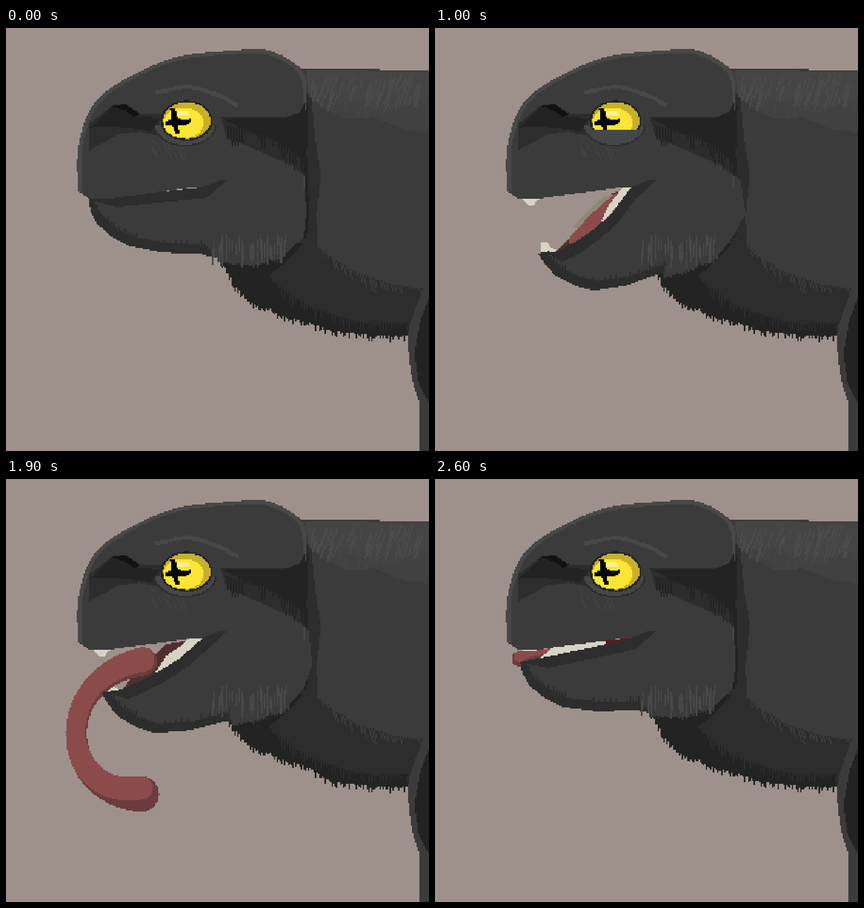
An HTML page with a canvas that plays this animation: 748 px wide and 748 px high, repeating every 2.7 s.

```html
<!DOCTYPE html>
<html lang="en">
<head>
<meta charset="utf-8">
<title>Creature</title>
<style>
  html, body { margin: 0; width: 100%; height: 100%; overflow: hidden; background: #9e918b; }
  canvas { display: block; width: 100vw; height: 100vh; image-rendering: pixelated; }
</style>
</head>
<body>
<canvas id="stage" width="300" height="300"></canvas>
<script>
const ctx = document.getElementById('stage').getContext('2d');
const GRID = 300, SCALE = GRID / 748, LOOP = 2700, STEP = 100;
const C = {
  back: '#9e918b', base: '#3b3b3b', dark: '#2d2d2d', deep: '#232323', rim: '#484848', soft: '#414141',
  lid: '#45464a', bone: '#d8d4c4', cheek: '#8e8878', blood: '#5f1b1b', cave: '#4f2f30',
  pink: '#8c4b4b', wine: '#6b3c3d', yellow: '#fbe635', gold: '#c9b02a', shine: '#fff28c', black: '#060606'
};

// Points are [x, y] or [x, y, width], written as "x,y x,y".
const pts = text => text.trim().split(/\s+/).map(p => p.split(',').map(Number));
const move = (list, dx, dy) => list.map(([x, y]) => [x + dx, y + dy]);
const mix = (a, b, f) => Array.isArray(a) ? a.map((v, i) => mix(v, b[i], f)) : a + (b - a) * f;
const noise = n => { const v = Math.sin(n * 127.1 + 11.7) * 43758.5453; return v - Math.floor(v); };

// Interpolates between [time, value] keys.
function pose(keys, t) {
  const i = keys.findIndex(k => k[0] >= t);
  if (i < 0) return keys[keys.length - 1][1];
  if (i === 0) return keys[0][1];
  const [t0, a] = keys[i - 1], [t1, b] = keys[i];
  return mix(a, b, (t - t0) / (t1 - t0));
}

const bezier = ([a, b, c, d], s) =>
  mix(mix(mix(a, b, s), mix(b, c, s), s), mix(mix(b, c, s), mix(c, d, s), s), s);

// Rounds an open line through its points.
function smooth(list) {
  const out = [], get = i => list[Math.max(0, Math.min(list.length - 1, i))];
  for (let s = 0; s <= list.length - 1; s += .125) {
    const i = Math.floor(s), f = s - i, [a, b, c, d] = [-1, 0, 1, 2].map(k => get(i + k));
    out.push(b.map((v, q) => v + f * (c[q] - a[q] + f * (2 * a[q] - 5 * v + 4 * c[q] - d[q]
      + f * (3 * (v - c[q]) + d[q] - a[q]))) / 2));
  }
  return out;
}

// Fills a polygon row by row, without soft edges.
function poly(color, shape) {
  const p = typeof shape === 'string' ? pts(shape) : shape;
  const ys = p.map(q => q[1] * SCALE);
  const end = Math.min(GRID, Math.ceil(Math.max(...ys)));
  ctx.fillStyle = color;
  for (let y = Math.max(0, Math.floor(Math.min(...ys))); y < end; y++) {
    const row = (y + .5) / SCALE, xs = [];
    p.forEach(([x0, y0], i) => {
      const [x1, y1] = p[(i + 1) % p.length];
      if ((y0 <= row) !== (y1 <= row)) xs.push((x0 + (x1 - x0) * (row - y0) / (y1 - y0)) * SCALE);
    });
    xs.sort((a, b) => a - b);
    for (let i = 0; i + 1 < xs.length; i += 2) {
      const x = Math.round(xs[i]);
      ctx.fillRect(x, y, Math.round(xs[i + 1]) - x, 1);
    }
  }
}

function oval(color, cx, cy, rx, ry = rx) {
  const p = [];
  for (let a = 0; a < 6.28; a += Math.PI / 16) p.push([cx + rx * Math.cos(a), cy + ry * Math.sin(a)]);
  poly(color, p);
}

function within(top, bottom, paint) {
  const y = Math.round(top * SCALE);
  ctx.save();
  ctx.beginPath();
  ctx.rect(0, y, GRID, Math.round(bottom * SCALE) - y);
  ctx.clip();
  paint();
  ctx.restore();
}

function hair(x, y, length, slant) {
  const rows = Math.round(Math.abs(length) * SCALE), dir = Math.sign(length);
  for (let i = 0; i <= rows; i++) {
    ctx.fillRect(Math.round(x * SCALE + i * slant), Math.round(y * SCALE) + i * dir, 1, 1);
  }
}

// Height of a line at x.
function heightAt(line, x) {
  for (let i = 1; i < line.length; i++) {
    const [x0, y0] = line[i - 1], [x1, y1] = line[i];
    if ((x - x0) * (x - x1) <= 0 && x0 !== x1) return y0 + (y1 - y0) * (x - x0) / (x1 - x0);
  }
  return line[line.length - 1][1];
}

// Hairs of random length along a line.
function fringe(color, shape, length, slant = 0, gap = 2.5) {
  const line = typeof shape === 'string' ? pts(shape) : shape, xs = line.map(p => p[0]);
  const root = 4 * Math.sign(length);
  ctx.fillStyle = color;
  for (let x = Math.ceil(Math.min(...xs) / gap) * gap; x < Math.max(...xs); x += gap) {
    hair(x, heightAt(line, x) - root, length * noise(x) ** 2 + root, slant);
  }
}

function scatter(color, count, x, y, w, h, length, slant) {
  ctx.fillStyle = color;
  for (let i = 0; i < count; i++) {
    hair(x + w * noise(i + x), y + h * noise(i * 3 + y), length * (.4 + .6 * noise(i * 7)), slant);
  }
}

const gapeKeys = [[300, 0], [800, .17], [1000, .5], [1700, .5], [2000, .33], [2600, .1]];
const throatKeys = [[1000, 0], [1700, 1], [2000, 1], [2600, 0]];
const lidKeys = [[900, 200], [1000, 180], [1400, 153], [1500, 132], [1600, 165], [1700, 200]];

// Tongue: a curve from root to tip with widths, and the shaded side at root and tip.
const tongueKeys = [
  [800, '325,303,0 298,327,0 271,352,0 244,376,0 0,0'],
  [1000, '325,303,24 298,327,30 271,352,26 244,376,16 0,0'],
  [1400, '325,303,26 240,400,50 160,325,48 153,428,36 1,1'],
  [1600, '305,312,40 95,345,50 45,560,28 134,602,54 1,.4'],
  [1700, '285,318,60 120,400,34 85,640,22 216,648,68 1,-.6'],
  [2000, '220,325,46 60,330,36 95,520,28 250,512,62 0,-1'],
  [2600, '205,307,14 185,309,14 170,311,12 150,318,28 1,.8']
].map(([t, text]) => [t, pts(text)]);

function drawTongue(t) {
  const curve = pose(tongueKeys, t), [rootSide, tipSide] = curve[4], count = 60;
  if (curve[0][2] < 2) return;
  const spots = Array.from({ length: count + 1 }, (_, i) => bezier(curve, i / count));
  for (const [x, y, w] of spots) oval(C.wine, x, y, w / 2);
  spots.forEach(([x, y, w], i) => {
    const a = spots[Math.max(0, i - 1)], b = spots[Math.min(count, i + 1)];
    const dx = b[0] - a[0], dy = b[1] - a[1], len = Math.hypot(dx, dy) || 1;
    const shade = .4 * mix(rootSide, tipSide, (i / count) ** 3), r = w / 2;
    oval(C.pink, x - dy / len * r * shade, y + dx / len * r * shade, r * (1 - Math.abs(shade)));
  });
}

// The jaw swings about its hinge; the flesh below sags as it opens.
const hinge = [350, 284], lipFront = [147, 303], lipCorner = [345, 282];
const chin = pts('149,322 160,345 185,368 215,385 275,397 345,400');

function swing([x, y], angle, sag) {
  const dx = x - hinge[0], dy = y - hinge[1], c = Math.cos(angle), s = Math.sin(angle);
  return [hinge[0] + dx * c + dy * s, hinge[1] + dy * c - dx * s + sag];
}

function jawAt(a) {
  const lip = [0, 1, 2, 3, 4, 5].map(i => swing(mix(lipFront, lipCorner, i / 5), a,
    110 * a * a * Math.sqrt(Math.sin(Math.PI * i / 5))));
  const under = chin.map((p, i) => swing(p, a, 18 * a * i)).reverse();
  const cheek = [[528 + 48 * a * a, 270], [531 + 72 * a * a, 328], [526, 370],
    [490 + 20 * a, 403], [430 + 40 * a, 417 + 16 * a], [375 + 60 * a, 408 + 60 * a]];
  return { lip, under, cheek };
}

function drawBody(t) {
  const lift = 12 * pose(throatKeys, t);
  const throat = pts('374,396 405,452 430,480 480,502 530,517 575,532')
    .map(([x, y], i) => [x, i % 5 ? y - lift : y]);
  const belly = [...throat, ...pts('620,537 655,541 708,541')];
  const under = pts('548,380 580,408 620,432 680,452 748,462');
  const shadow = pts('465,438 482,455 530,488 600,514 650,523 710,520');
  const leg = smooth(pts('748,442 722,500 711,550 718,620 731,662'));
  poly(C.base, [...belly, ...pts('748,560 748,76 640,73 520,73 500,200 480,380')]);
  poly(C.soft, '530,75 748,77 748,185 700,178 650,158 600,160 560,140 534,118');
  poly('#454545', '530,75 748,77 748,125 690,138 630,128 534,105');
  fringe('#454545', '534,105 630,128 690,138 748,125', 32, -.25, 5);
  scatter('#4c4c4c', 75, 540, 80, 200, 45, 26, -.3);
  poly(C.dark, '526,105 540,125 547,200 557,260 549,330 552,390 510,420 500,250');
  poly(C.deep, '528,120 535,140 532,220 536,330 530,385 505,410 510,250');
  poly(C.dark, [...belly, [748, 560], ...under.slice().reverse(), [525, 370], [470, 420]]);
  fringe(C.base, under, 30, .25, 5);
  poly(C.deep, [...belly, ...shadow.slice().reverse(), ...pts('500,410 525,380 430,390')]);
  fringe(C.dark, shadow, 20, .1, 5);
  fringe(C.deep, belly, 13);
  poly(C.base, [...leg, [731, 748], [748, 748]]);
  poly(C.deep, '748,475 733,515 722,575 730,630 748,664');
}

function drawMouth(t, gape, { lip }) {
  poly(t < 1000 || t > 2300 ? C.blood : C.cave, [[180 + 265 * gape, 292], [352, 281], ...lip.slice(1).reverse()]);
  if (t >= 1000 && t <= 1600) poly(C.cheek, '243,352 297,299 316,293 300,312 255,354');
  poly(C.bone, '155,302 186,302 177,306 175,314 166,314 160,308');
  const [x, y] = lip[0];
  poly(C.bone, move(pts('6,-18 17,-20 24,-10 33,-6 27,5 5,4'), x, y));
  drawTongue(t);
  const from = 160 + 265 * gape, to = Math.min(350, 285 + 160 * gape);
  const gum = [0, .25, .5, .75, 1].map(f => mix(from, to, f)).map(px => [px, heightAt(lip, px)]);
  poly(C.bone, [...gum, ...move(gum.slice(1).reverse(), 0, -20)]);
}

function drawJaw({ lip, under, cheek }) {
  const inner = move(under, 7, -16);
  poly(C.dark, [...lip, [400, 240], [510, 230], ...cheek, ...under]);
  poly(C.base, [...move(lip.slice(1), 10, 18), [400, 262], [510, 235], ...cheek, ...inner]);
  fringe(C.dark, inner, -9, 0, 5);
  fringe(C.base, cheek.slice(3), 6);
  scatter(C.rim, 48, 358, 362, 138, 34, 28, 0);
}

const crown = smooth(pts('127,290 128,208 154,135 210,91 300,52 400,40 465,40 520,71 532,112 528,160'));
const crownInner = crown.map(p => mix(p, [350, 230], .035));
const upperLip = pts('528,300 500,300 380,268 345,282 320,283 240,294 180,302 148,302 127,289');

function drawHead() {
  poly(C.rim, [...crown, ...upperLip]);
  poly(C.base, [...crownInner, ...upperLip]);
  poly(C.dark, '380,158 495,158 520,148 529,130 528,262 505,243 465,226 390,192');
  poly(C.deep, '382,159 495,159 520,149 529,130 529,240 510,222 470,195 420,180');
  fringe(C.deep, '390,176 420,180 470,195 510,222 528,238', 36, .1, 5);
  poly(C.dark, '148,216 148,168 190,135 212,135 238,152 275,153 268,190 235,183 200,188');
  poly(C.deep, '148,176 190,136 212,138 235,156 272,160 258,182 185,174');
  poly('#121212', '186,137 213,135 238,152 226,157 212,147');
  for (const [x, y] of smooth(pts('268,114 320,104 370,117 408,136'))) oval(C.rim, x, y, 4);
  scatter(C.soft, 24, 255, 190, 65, 30, 14, .5);
}

function drawEye(t) {
  const lid = pose(lidKeys, t);
  within(Math.min(lid, 172), 220, () => {
    oval(C.dark, 317, 170, 56, 40);
    oval(C.lid, 317, 170, 53, 37);
  });
  within(0, lid, () => {
    oval(C.deep, 319, 164, 46, 36);
    oval(C.gold, 319.5, 163.5, 42, 32.5);
    oval(C.yellow, 314, 168, 35.5, 27);
    poly(C.shine, '302,147 318,147 329,153 303,155');
    poly(C.black, `290,142 299,142 303,158 315,163 326,160 326,168 313,173 303,172 308,188 300,188
      295,173 281,171 281,165 293,162`);
  });
}

function draw(t) {
  const gape = pose(gapeKeys, t), jaw = jawAt(gape);
  ctx.fillStyle = C.back;
  ctx.fillRect(0, 0, GRID, GRID);
  drawBody(t);
  if (gape > 0) drawMouth(t, gape, jaw);
  drawJaw(jaw);
  drawHead();
  drawEye(t);
}

const start = performance.now();
let shown = -1;
function tick() {
  const t = Math.floor((performance.now() - start) % LOOP / STEP) * STEP;
  if (t !== shown) draw(shown = t);
  requestAnimationFrame(tick);
}
tick();
</script>
</body>
</html>
```
